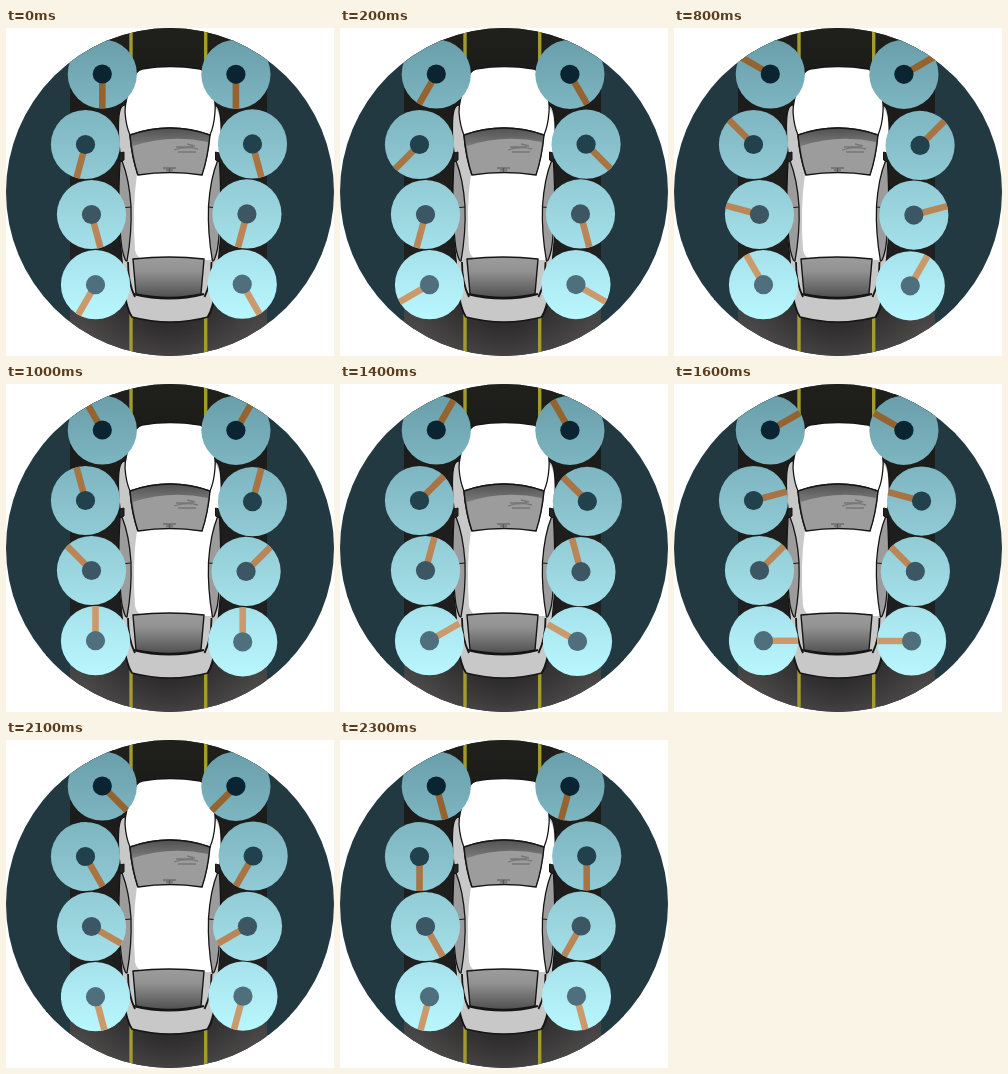
An HTML page that plays this animation: 328x328 px, repeating every 2400 ms.

```html
<!DOCTYPE html>
<html lang="en">
<head>
<meta charset="utf-8">
<title>Car with turning wheels</title>
<style>
html, body { margin: 0; width: 100%; height: 100%; overflow: hidden; background: #fff; }
svg { display: block; width: 328px; height: 328px; }
</style>
</head>
<body>
<svg viewBox="0 0 328 328">
  <defs>
    <clipPath id="stage"><circle cx="164" cy="164" r="164"/></clipPath>
    <linearGradient id="road" x2="0" y2="1">
      <stop stop-color="#20201b"/><stop offset=".15" stop-color="#1b1b19"/><stop offset=".7" stop-color="#212020"/>
      <stop offset=".86" stop-color="#434141"/><stop offset="1" stop-color="#535050"/>
    </linearGradient>
    <radialGradient id="shade" gradientUnits="userSpaceOnUse" cx="164" cy="270" r="90">
      <stop offset=".2" stop-color="#111" stop-opacity=".55"/><stop offset="1" stop-color="#111" stop-opacity="0"/>
    </radialGradient>
    <linearGradient id="disc" gradientUnits="userSpaceOnUse" x1="0" y1="11" x2="0" y2="292">
      <stop stop-color="#699fab"/><stop offset="1" stop-color="#b9f7ff"/>
    </linearGradient>
    <linearGradient id="glass" x2="0" y2="1">
      <stop stop-color="#505050"/><stop offset=".5" stop-color="#8a8a8a"/>
    </linearGradient>
    <linearGradient id="rear" x2="0" y2="1">
      <stop stop-color="#9c9c9c"/><stop offset=".35" stop-color="#929292"/><stop offset="1" stop-color="#505050"/>
    </linearGradient>
    <g id="side" stroke="#151515" stroke-linejoin="round">
      <path d="M118 124l-4 1q-2 5 0 9l4-2z" fill="#222"/>
      <path d="M114 134Q111 185 116 221Q119 234 121 233Q126 205 125 178Q123 150 116 133Z" fill="#9c9c9c" stroke-width="1.3"/>
      <path d="M114 180l11-1" fill="none"/>
      <path d="M124 107Q126 130 132 147" fill="none" stroke-width="1.6"/>
      <path d="M122 234Q122 255 129 269" fill="none" stroke-width="1.8"/>
      <path d="M118 262Q121 281 126 289" fill="none" stroke-width="1.6"/>
    </g>
  </defs>
  <g clip-path="url(#stage)">
    <path d="M0 0h328v328H0z" fill="#233941"/>
    <path d="M64 0h197v328H64z" fill="url(#road)"/>
    <path d="M64 180h197v148H64z" fill="url(#shade)"/>
    <path d="M125 0v328M199.7 0v328" stroke="#a39b2b" stroke-width="3.4"/>

    <path d="M118 77Q113 78 112.5 95Q112 115 115 130Q111 160 113 205Q117 235 118 262Q120 281 126 289Q164 299 202 289Q208 281 210 262Q212 235 215 205Q217 160 213 130Q216 115 215 95Q214 78 209 77Z"
          fill="#c8c8c8" stroke="#151515" stroke-width="1.3"/>
    <path d="M206 78Q213 80 214 95Q215 115 212 130Q215 170 212 205L205 232H196V78Z" fill="#fff"/>
    <path d="M136 41Q164 36 194 41Q202 44 206 60Q210 74 209 84Q208 98 204 107Q164 93 124 107Q120 98 119 84Q119 72 126 54Q130 42 136 41Z"
          fill="#fff" stroke="#151515" stroke-width="1.3"/>
    <path d="M131 146Q164 142 197 146Q203 180 199 225Q198 231 192 231Q164 228 138 231Q131 231 129 222Q126 180 131 146Z" fill="#fff"/>
    <use href="#side"/>
    <use href="#side" transform="matrix(-1 0 0 1 327.5 0)"/>
    <path d="M124 107Q164 93 204 107Q202 129 196 147Q164 142 132 147Q126 129 124 107Z" fill="url(#glass)"/>
    <path d="M127 118Q164 106 202 114Q200 132 196 147Q164 142 132 147Q128 132 127 118Z" fill="#9c9c9c"/>
    <path d="M124 107Q164 93 204 107Q202 129 196 147Q164 142 132 147Q126 129 124 107Z" fill="none" stroke="#151515" stroke-width="1.4"/>
    <path d="M168 122q12-4 24-1M170 119h17M172 124h18M181 116l8 2" fill="none" stroke="#777" stroke-width="1.3"/>
    <path d="M157 140h13M160 142h7M163.5 140v4" stroke="#555"/>
    <path d="M127 231Q164 227 198 231L195 266Q164 273 130 266Z" fill="url(#rear)" stroke="#151515" stroke-width="1.4"/>
    <path d="M127 266Q164 275 198 266" fill="none" stroke="#151515" stroke-width="2"/>
    <g id="wheels"></g>
  </g>
</svg>
<script>
// centre x, centre y, starting angle, spoke colour, hub colour
const rows = [
  [96.3, 46, 180, '#95632f', '#0a2531'],
  [79.5, 116.5, 195, '#a87444', '#21414d'],
  [85.5, 186.5, 165, '#bb8657', '#3d5663'],
  [89.5, 256.7, 210, '#cb9a6c', '#506f7d']
];
const layer = document.getElementById('wheels');
const wheels = [];

function add(parent, tag, attrs) {
  const el = document.createElementNS('http://www.w3.org/2000/svg', tag);
  for (const key in attrs) el.setAttribute(key, attrs[key]);
  return parent.appendChild(el);
}

rows.forEach(([left, top, start, spokeColour, hubColour], row) => {
  for (const dir of [1, -1]) {
    const x = dir > 0 ? left : 326.2 - left;
    const y = dir > 0 ? top : top + 0.3;
    const group = add(layer, 'g', {});
    add(group, 'circle', { cx: x, cy: y, r: 34.6, fill: 'url(#disc)' });
    const spoke = add(group, 'path', { d: `M${x} ${y}v-34.4`, stroke: spokeColour, 'stroke-width': 6.6 });
    add(group, 'circle', { cx: x, cy: y, r: 9.6, fill: hubColour });
    // Most right-hand wheels run slightly off centre.
    wheels.push({ group, spoke, x, y, start, dir, wobble: dir < 0 && row ? 0.9 : 0 });
  }
});

function draw() {
  const turn = Math.floor(performance.now() % 2400 / 100) * 15;
  for (const { group, spoke, x, y, start, dir, wobble } of wheels) {
    const angle = dir * (start + turn);
    const rad = angle * Math.PI / 180;
    spoke.setAttribute('transform', `rotate(${angle} ${x} ${y})`);
    group.setAttribute('transform', `translate(${-wobble * Math.sin(rad)} ${wobble * Math.cos(rad)})`);
  }
  requestAnimationFrame(draw);
}
draw();
</script>
</body>
</html>
```
